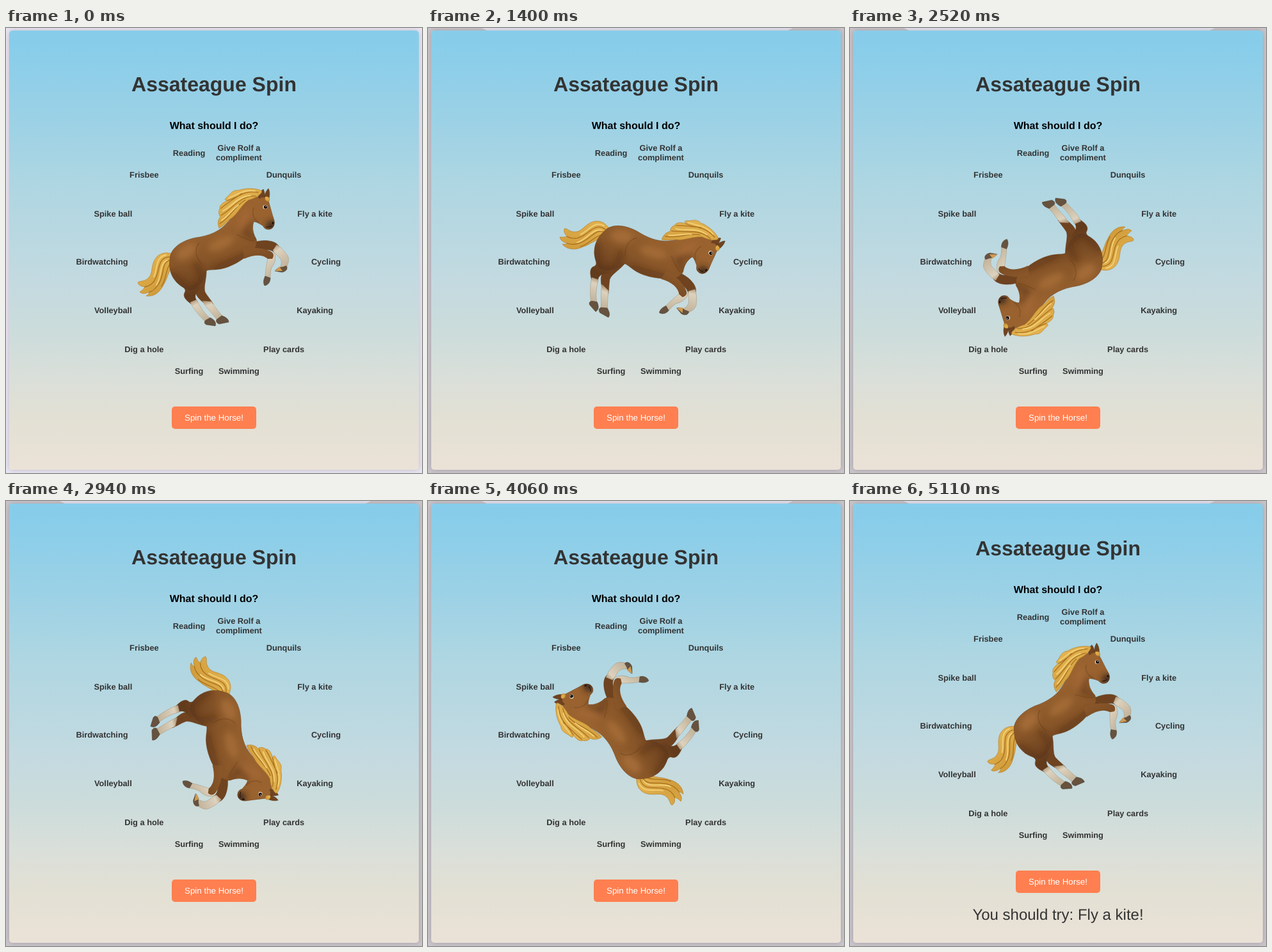
Animation of 650 by 696 pixels, one loop 6020 ms. Source, as an HTML page:

```html
<!DOCTYPE html>
<html lang="en">
<head>
<meta charset="utf-8">
<title>Assateague Spin</title>
<style>
  html, body { margin: 0; width: 100%; height: 100%; overflow: hidden; }
  svg { display: block; width: 650px; height: 696px; font-family: Arial, "Liberation Sans", sans-serif; }
  text { text-anchor: middle; fill: #333; text-rendering: geometricPrecision; }
  .label { font: bold 12.8px Arial, "Liberation Sans", sans-serif; }
  .coat { fill: url(#coat); stroke: #693e1b; stroke-width: .5; }
  .dark { fill: #6f4320; stroke: #5b3416; stroke-width: .5; }
  .sock { fill: url(#sock); stroke: #a3947c; stroke-width: .5; }
  .hoof { fill: #66523f; stroke: #493a2c; stroke-width: .5; }
  .hair { fill: url(#hair); stroke: #b17b2a; stroke-width: .6; }
  .strands path { fill: none; stroke-linecap: round; }
  .deep { stroke: #a8711f; stroke-width: 1.3; }
  .shine { stroke: #f3d076; stroke-width: 1.8; }
</style>
</head>
<body>
<svg viewBox="0 0 650 696">
  <defs>
    <linearGradient id="sky" x2="0" y2="1">
      <stop offset=".03" stop-color="#87cdea"/>
      <stop offset=".23" stop-color="#9fd2e5"/>
      <stop offset=".34" stop-color="#add6e2"/>
      <stop offset=".58" stop-color="#c4dae0"/>
      <stop offset=".68" stop-color="#cbdcdb"/>
      <stop offset=".79" stop-color="#dadfd9"/>
      <stop offset=".89" stop-color="#e3e0d4"/>
      <stop offset="1" stop-color="#ebe2d7"/>
    </linearGradient>
    <linearGradient id="coat" gradientUnits="userSpaceOnUse" x1="310" y1="310" x2="330" y2="410">
      <stop stop-color="#99622f"/>
      <stop offset=".5" stop-color="#875528"/>
      <stop offset="1" stop-color="#623b1c"/>
    </linearGradient>
    <linearGradient id="sock" x2=".4" y2="1">
      <stop stop-color="#a98a66"/>
      <stop offset=".3" stop-color="#ddd2be"/>
      <stop offset="1" stop-color="#c4b59c"/>
    </linearGradient>
    <linearGradient id="hair" x2=".5" y2="1">
      <stop stop-color="#e8b955"/>
      <stop offset="1" stop-color="#d09b3a"/>
    </linearGradient>
    <filter id="soft" x="-50%" y="-50%" width="200%" height="200%"><feGaussianBlur stdDeviation="5"/></filter>
    <filter id="shadow"><feDropShadow dx="0" dy="0" stdDeviation="4" flood-opacity=".2"/></filter>
    <path id="torso" d="M396 267C401 262 407 265 410 270C413 280 416 292 419 301C421 309 416 316 409 315C405 315 403 312 401 309C396 306 391 303 387 303C384 312 386 322 391 330C393 338 390 345 383 350C372 362 352 374 335 377C322 379 314 377 312 381C308 396 300 409 288 410C270 406 252 388 256 362C256 346 272 333 296 328C318 325 335 318 348 302C358 292 366 272 380 262C386 258 392 262 396 267Z"/>
    <clipPath id="body"><use href="#torso"/></clipPath>
  </defs>

  <rect id="edge" width="650" height="696"/>
  <path id="strip" d="M84 0H570L560 5H94Z" fill="#e5e4f1"/>
  <rect x="5" y="4" width="640" height="687" rx="5" fill="url(#sky)" filter="url(#shadow)"/>

  <g id="page">
    <text x="325" y="99" font-size="32" font-weight="bold">Assateague Spin</text>
    <text x="325" y="158" font-size="16" font-weight="bold" style="fill:#000">What should I do?</text>

    <g id="horse">
      <path class="hair" d="M260 353C248 350 237 352 231 365C226 377 230 386 220 393C214 397 209 395 206 398C207 403 212 404 217 405C214 410 211 411 209 413C214 417 219 415 224 413C223 417 220 418 219 419C231 421 241 413 246 402C252 393 253 383 259 374Z"/>
      <g class="strands">
        <path class="deep" d="M255 358C237 359 240 379 234 391C230 401 222 404 217 405M256 363C242 367 248 388 238 401C233 409 228 412 224 413M257 368C249 377 251 393 243 404"/>
        <path class="shine" d="M250 355C233 358 237 377 231 389M252 363C239 368 244 389 235 402"/>
      </g>
      <path class="dark" d="M298 380L313 376C314 392 308 404 311 413C315 420 320 425 324 432L316 435C306 428 297 421 296 412Z"/>
      <path class="sock" d="M307 427L321 428C328 438 333 445 339 451L330 457C323 447 312 437 307 427Z"/>
      <path class="hoof" d="M337 450C344 452 348 456 348 460L333 463C328 461 328 458 329 456Z"/>
      <path class="dark" d="M372 341C386 334 402 330 416 334C425 337 428 342 427 347L418 350C412 345 402 347 392 350C384 352 378 351 372 352Z"/>
      <path class="sock" d="M423 339C430 343 437 351 441 358C443 364 440 371 437 377L427 377C431 370 431 364 428 360C424 356 420 352 417 348Z"/>
      <path class="hoof" d="M438 372C441 376 438 381 431 382L420 380C423 376 428 374 432 374Z"/>
      <path d="M420 380L427 373L432 380Z" fill="#d19a50"/>
      <path class="coat" d="M266 397C276 404 283 409 279 414C276 420 281 426 290 432L299 428C293 420 296 414 304 406L290 394Z"/>
      <path class="sock" d="M288 429L298 425C304 438 311 447 319 454L312 460C302 450 293 440 288 429Z"/>
      <path class="hoof" d="M312 457L319 453C325 456 329 460 327 466L313 464C309 462 310 459 312 457Z"/>
      <path class="dark" d="M394 269C393 261 398 255 402 252C405 258 405 264 403 269ZM404 267C404 259 407 254 410 251C413 257 412 264 410 270Z"/>
      <use href="#torso" class="coat"/>
      <g clip-path="url(#body)">
        <g filter="url(#soft)">
          <ellipse cx="282" cy="350" rx="18" ry="10" fill="#b0753f" opacity=".65" transform="rotate(-35 282 350)"/>
          <ellipse cx="336" cy="337" rx="22" ry="9" fill="#ad723d" opacity=".65" transform="rotate(-25 336 337)"/>
          <ellipse cx="372" cy="301" rx="7" ry="22" fill="#a86c38" opacity=".6" transform="rotate(18 372 301)"/>
          <path d="M386 302L371 320L395 330M306 382L294 367M258 382L286 413L309 395L301 380M324 378L382 351" fill="none" stroke="#4f2c12" stroke-width="7" opacity=".55"/>
          <ellipse cx="415" cy="309" rx="8" ry="7" fill="#37261c"/>
        </g>
        <path d="M302 336C294 346 296 359 306 370M361 323C371 328 379 333 388 333M387 281C384 290 386 299 395 304" fill="none" stroke="#5f3719" stroke-width="1.5" opacity=".35"/>
      </g>
      <path class="sock" d="M419 351C423 360 420 368 415 375C413 381 413 386 413 391L405 389C405 380 407 371 409 359Z"/>
      <path d="M370 345C388 342 404 345 413 349C419 352 419 357 416 361L409 361C401 354 388 354 372 361Z" fill="url(#coat)"/>
      <path class="hoof" d="M405 388L413 391C413 397 410 402 404 403C401 398 403 392 405 388Z"/>
      <path class="hair" d="M398 254C388 250 374 250 363 254C356 253 352 257 347 263C342 267 340 269 346 270C338 273 333 278 334 283C331 288 333 293 335 295C330 301 331 308 333 313C340 310 345 303 350 299C361 293 367 277 379 269C387 267 396 263 400 256Z"/>
      <g class="strands">
        <path class="deep" d="M394 257C371 254 365 264 346 270M390 263C366 262 356 281 336 293M374 269C360 276 351 296 334 306M368 259C356 268 343 275 336 282"/>
        <path class="shine" d="M389 255C370 252 361 261 348 266M382 262C360 264 354 279 339 286M363 277C353 284 346 295 337 301"/>
      </g>
      <path class="hair" d="M405 264C411 263 413 267 411 271C406 272 404 268 405 264Z"/>
      <ellipse cx="405" cy="280" rx="3.6" ry="3.2" fill="#eadbc6"/>
      <circle cx="405.5" cy="280" r="2.7" fill="#190f09"/>
      <circle cx="406.2" cy="279" r=".7" fill="#fff"/>
      <ellipse cx="417" cy="305" rx="1.2" ry="2" fill="#150d08"/>
      <path d="M406 311Q411 312 415 310" fill="none" stroke="#1e130c"/>
    </g>

    <g id="labels"></g>
    <rect x="259" y="592" width="132" height="35" rx="5" fill="#ff7f50"/>
    <text x="325" y="614" font-size="13.333" style="fill:#fff">Spin the Horse!</text>
    <text id="result" x="325" y="669" font-size="24">You should try: Fly a kite!</text>
  </g>
</svg>
<script>
const $ = id => document.getElementById(id);
const CENTER = { x: 325, y: 366 }, RADIUS = 175, BASELINE = 4.45, LINE_HEIGHT = 15;
const LOOP = 6020, STEP = 70, SPIN_START = 10, SPIN_STEPS = 63;

const activities = ['Give Rolf a|compliment', 'Dunquils', 'Fly a kite', 'Cycling', 'Kayaking',
  'Play cards', 'Swimming', 'Surfing', 'Dig a hole', 'Volleyball', 'Birdwatching',
  'Spike ball', 'Frisbee', 'Reading'];

activities.forEach((name, i) => {
  const angle = (i - 3) * 2 * Math.PI / activities.length;
  const lines = name.split('|');
  const top = CENTER.y + BASELINE + RADIUS * Math.sin(angle) - (lines.length - 1) / 2 * LINE_HEIGHT;
  lines.forEach((line, n) => {
    const text = document.createElementNS('http://www.w3.org/2000/svg', 'text');
    text.setAttribute('class', 'label');
    text.setAttribute('x', CENTER.x + RADIUS * Math.cos(angle));
    text.setAttribute('y', Math.round(top + n * LINE_HEIGHT));
    text.textContent = line;
    $('labels').append(text);
  });
});

// Decelerating spin: [step, degrees], joined by a smooth cubic.
const spin = [[0, 0], [10, 760.2], [20, 1320.3], [32, 1899], [40, 2231.3], [48, 2418], [63, 2508.5]];

function speedAt(i) {
  if (i === 0) return 82;
  if (i === spin.length - 1) return 0;
  return (spin[i + 1][1] - spin[i - 1][1]) / (spin[i + 1][0] - spin[i - 1][0]);
}

function angleAt(step) {
  const i = Math.max(0, spin.findIndex(key => key[0] >= step) - 1);
  const [t0, a0] = spin[i], [t1, a1] = spin[i + 1];
  const span = t1 - t0, u = (step - t0) / span, v = 1 - u;
  return a0 * v * v * (1 + 2 * u) + a1 * u * u * (3 - 2 * u)
    + span * u * v * (speedAt(i) * v - speedAt(i + 1) * u);
}

function draw(now) {
  const tick = Math.floor(now % LOOP / STEP);
  const step = Math.min(SPIN_STEPS, Math.max(0, tick - SPIN_START));
  const done = step === SPIN_STEPS;
  $('horse').setAttribute('transform', `rotate(${angleAt(step)} ${CENTER.x} ${CENTER.y})`);
  $('page').setAttribute('transform', `translate(0 ${done ? -14 : 0})`);
  $('result').setAttribute('visibility', done ? 'visible' : 'hidden');
  $('edge').setAttribute('fill', tick ? '#cac5cb' : '#eae5f3');
  $('strip').setAttribute('visibility', tick ? 'visible' : 'hidden');
}

const start = performance.now();
(function loop() {
  draw(performance.now() - start);
  requestAnimationFrame(loop);
})();
</script>
</body>
</html>
```
